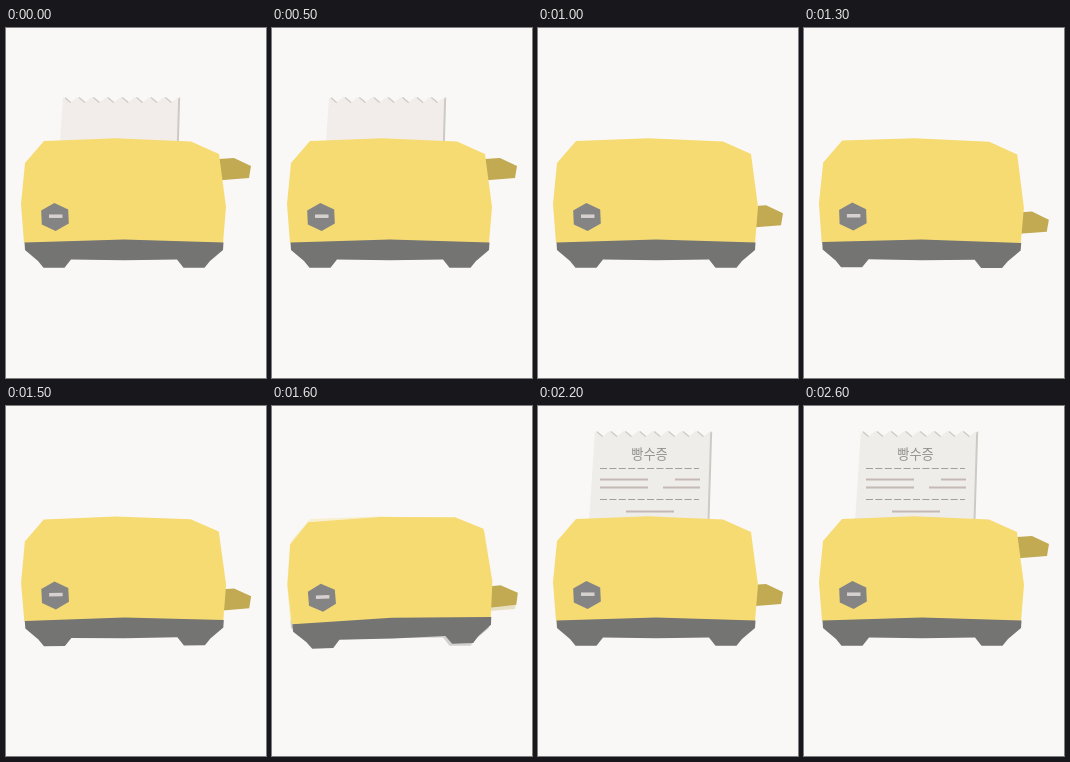
An HTML page with a canvas that plays this animation: 260 by 350 pixels, repeating every 2.8 s.

```html
<!DOCTYPE html>
<html lang="ko">
<head>
<meta charset="utf-8">
<title>Toaster</title>
<style>
  html, body { margin: 0; width: 100%; height: 100%; overflow: hidden; background: #f9f8f6; }
  canvas { display: block; width: 260px; height: 350px; }
</style>
</head>
<body>
<canvas width="260" height="350"></canvas>
<script>
const ctx = document.querySelector('canvas').getContext('2d');
const LOOP = 2800, STEP = 100;
const CENTER = 118, PIVOT_X = 125, PIVOT_Y = 165;
const TRAVEL = 53, SWING = 2.1 * Math.PI / 180;

// Sine ease in and out, clamped to the given span.
function ease(t, start, end) {
  const u = Math.min(1, Math.max(0, (t - start) / (end - start)));
  return (1 - Math.cos(Math.PI * u)) / 2;
}

function poly(points, color) {
  ctx.fillStyle = color;
  ctx.beginPath();
  for (const [x, y] of points) ctx.lineTo(x, y);
  ctx.closePath();
  ctx.fill();
}

function stroke(x1, x2, y, width, color, dash = []) {
  ctx.strokeStyle = color;
  ctx.lineWidth = width;
  ctx.setLineDash(dash);
  ctx.beginPath();
  ctx.moveTo(x1, y);
  ctx.lineTo(x2, y);
  ctx.stroke();
}

function sheet(color, shift) {
  const teeth = 8, pitch = 14.4, edge = [];
  for (let i = 0; i <= teeth * 2; i++) {
    edge.push([57 + shift + i * pitch / 2, i % 2 ? 6 : 0]);
  }
  poly([...edge, [169.5 + shift, 90], [51 + shift, 90]], color);
}

function receiptText() {
  const ink = '#c5b9b5';
  ctx.fillStyle = '#949291';
  ctx.font = '500 13.3px "Noto Sans CJK KR", "Noto Sans CJK", sans-serif';
  ctx.textAlign = 'center';
  ctx.fillText('빵수증', 111.5, 28);
  for (let i = 0; i < 2; i++) {
    stroke(62, 161, 37.5 + i * 31, 1.2, '#a39f9d', [7, 2.4]);
    stroke(62, 110, 48.5 + i * 8, 2, ink);
    stroke(137 - i * 12, 162, 48.5 + i * 8, 2, ink);
  }
  stroke(88, 136, 80.5, 2, ink);
}

function paper(top, printed) {
  ctx.save();
  ctx.translate(0, top);
  sheet('#cdcac6', 2);
  sheet(printed ? '#eeedea' : '#f2edeb', 0);
  if (printed) receiptText();
  ctx.restore();
}

function lever(y) {
  poly([[205, y + 1.5], [228, y], [245, y + 8], [243, y + 20], [205, y + 23]], '#c2aa52');
}

function body() {
  poly([[38, 113], [110, 110.3], [185, 113.5], [213, 126], [220, 179],
    [217, 215], [18, 215], [15, 176], [19, 135]], '#f6db73');
}

// The base is one half outline and its mirror image.
function base() {
  const half = [[0, 211.5], [99.5, 214.5], [99, 222], [86, 233],
    [80.5, 239.7], [59.5, 239.7], [53, 231.6], [0, 232.3]];
  const side = sign => half.map(([x, y]) => [CENTER + sign * x, y]);
  poly([...side(1), ...side(-1).reverse()], '#747473');
}

function knob() {
  const corners = Array.from({ length: 6 }, (_, i) => {
    const a = i * Math.PI / 3 - Math.PI / 2 - 0.04;
    return [49 + 15.6 * Math.cos(a), 189 + 14 * Math.sin(a)];
  });
  poly(corners, '#848484');
  stroke(43, 56.5, 188.2, 3.5, '#d6d0cf');
}

function toaster(drop, angle) {
  ctx.save();
  ctx.translate(PIVOT_X, PIVOT_Y);
  ctx.rotate(angle);
  ctx.translate(-PIVOT_X, -PIVOT_Y);
  lever(130 + drop);
  body();
  base();
  knob();
  ctx.restore();
}

function draw(t) {
  const down = ease(t, 480, 1140);
  const drop = TRAVEL * (down - ease(t, 2100, 2600));
  const shaking = t >= 1100 && t < 1700;
  const angle = shaking ? SWING * Math.sin(2 * Math.PI * (t - 1290) / 400) : 0;

  ctx.fillStyle = '#f9f8f6';
  ctx.fillRect(0, 0, 260, 350);
  if (t < 1100) paper(69 + TRAVEL * down, false);
  if (t > 1800) paper(113 - 88 * ease(t, 1800, 2200), true);

  // The last swing leaves a faint trace of the resting pose.
  if (shaking && t >= 1600) {
    ctx.globalAlpha = 0.3;
    toaster(drop, 0);
    ctx.globalAlpha = 1;
  }
  toaster(drop, angle);
}

function tick() {
  const t = performance.now() % LOOP;
  draw(Math.floor(t / STEP) * STEP);
  requestAnimationFrame(tick);
}
tick();
</script>
</body>
</html>
```
